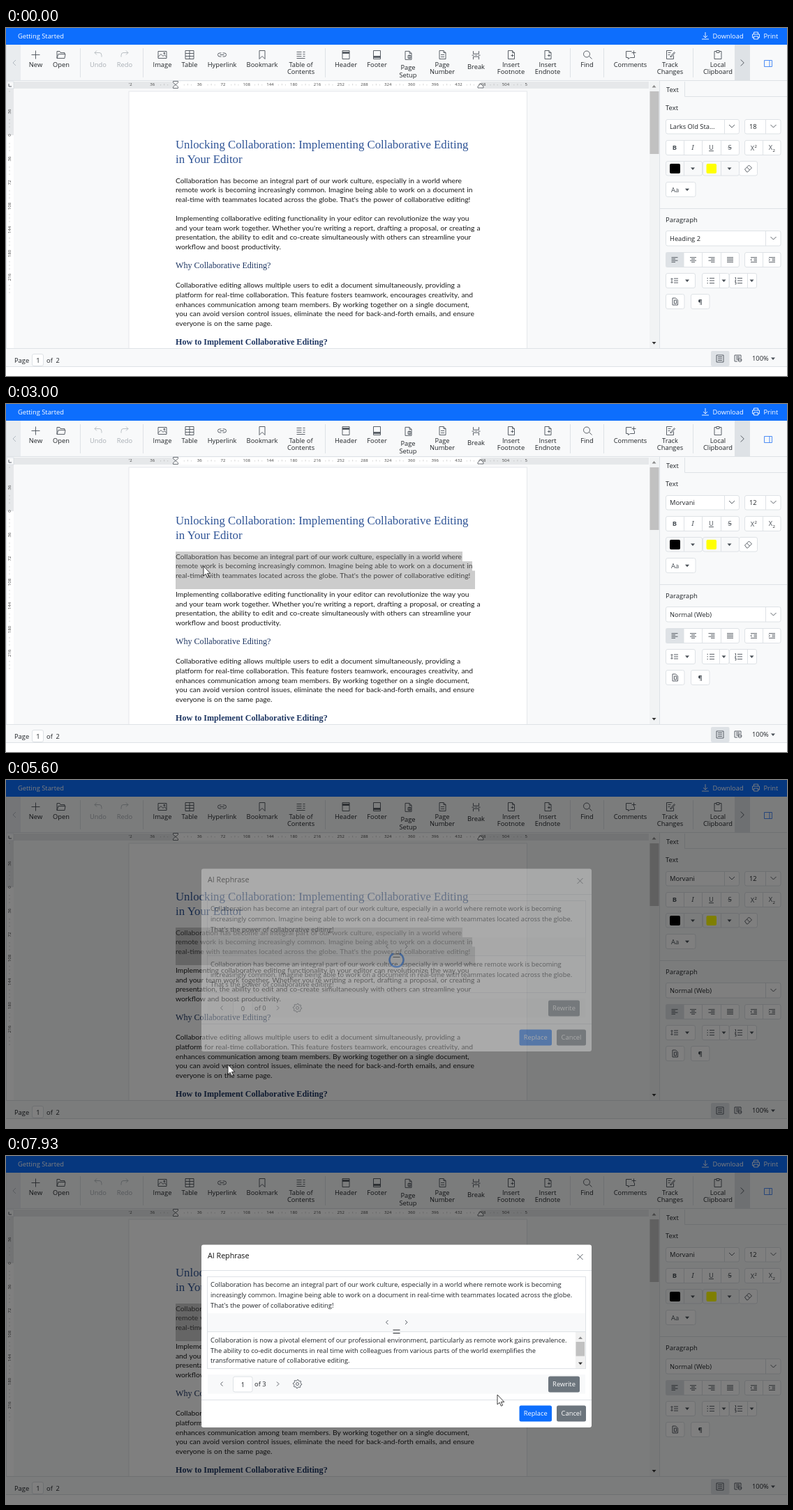
Write an HTML page that moves like this. It is 1119x500 px and loops after 8000 ms.

```html
<!DOCTYPE html>
<html lang="en">
<head>
<meta charset="utf-8">
<title>Document editor</title>
<style>
html, body { margin: 0; width: 100%; height: 100%; overflow: hidden; background: #fff; }
svg { display: block; width: 100vw; height: 100vh; }
text { font-family: "Open Sans", "Noto Sans", sans-serif; font-size: 9.33px; fill: #212529; white-space: pre; }
.doc { font-family: Lato, sans-serif; font-size: 10.3px; word-spacing: .5px; fill: #1c1c1c; }
.serif { font-family: "Liberation Serif", serif; font-size: 12.1px; fill: #1f3763; }
.title { font-size: 16.8px; fill: #2f5496; }
.tick { font-size: 6px; fill: #444; }
.mid { text-anchor: middle; }
.icon { fill: none; stroke: #495057; stroke-width: .9; }
.line { fill: none; stroke: #dee2e6; }
</style>
</head>
<body>
<svg id="stage" viewBox="0 0 1119 500" preserveAspectRatio="none"></svg>
<script>
const LOOP = 8000, TICK = 1000 / 15;

// Markup helpers
const text = (x, y, s, cls = '', extra = '') => `<text x="${x}" y="${y}" class="${cls}" ${extra}>${s}</text>`;
const label = (x, y, s, extra) => text(x, y, s, 'mid', extra);
const rect = (x, y, w, h, fill, extra = '') => `<rect x="${x}" y="${y}" width="${w}" height="${h}" fill="${fill}" ${extra}/>`;
const box = (x1, y1, x2, y2, fill = '#fff') => rect(x1 + .5, y1 + .5, x2 - x1 - 1, y2 - y1 - 1, fill, 'stroke="#dee2e6" rx="2.5"');
const path = (d, extra = '') => `<path d="${d}" ${extra}/>`;
const line = d => path(d, 'class="line"');
const icon = (x, y, d, extra = '') => `<g transform="translate(${x} ${y})">${path(d, 'class="icon" ' + extra)}</g>`;
const caret = (x, y, s = 1, fill = '#495057') => path(`M${x - 3} ${y - 1.5 * s}h6l-3 ${3.4 * s}z`, `fill="${fill}"`);
const chevron = (x, y) => icon(x, y, 'M-4-2L0 2L4-2');
const side = (x, y, dir, r = 3) => icon(x, y, `M${-dir * r / 2} ${-r}L${dir * r / 2} 0L${-dir * r / 2} ${r}`);
const lines = (x, y, step, rows, cls) => rows.map((s, i) => text(x, y + i * step, s, cls)).join('');

const PAGE = 'M-4-6H2L5-3V6H-4ZM2-6V-3H5';
const ICONS = {
  plus: 'M-6 0H6M0-6V6',
  folder: 'M-6 5V-5H-2L-1-3H5V-1M-6 5L-4-1H6L5 5Z',
  undo: 'M-2-6L-5-3L-2 0M-5-3H2Q5-3 5 1V3',
  redo: 'M2-6L5-3L2 0M5-3H-2Q-5-3-5 1V3',
  image: 'M-6-5H6V5H-6ZM-6 3L-2-1L1 2L3 0L6 3M2-3H3.5V-1.5H2Z',
  table: 'M-6-6H6V6H-6ZM-6-2H6M-6 2H6M0-6V6',
  link: 'M-1-2.5H-3.5A2.5 2.5 0 0 0-3.5 2.5H-1M1-2.5H3.5A2.5 2.5 0 0 1 3.5 2.5H1M-3 0H3',
  bookmark: 'M-4-6H4V6L0 2L-4 6Z',
  toc: 'M-6-4H1M3-4H6M-6-1H1M3-1H6M-6 2H1M3 2H6M-6 5H6',
  header: 'M-5-6H5V6H-5ZM-5-4H5M-5-3H5M-5-2H5',
  footer: 'M-5-6H5V6H-5ZM-5 2H5M-5 3H5M-5 4H5',
  setup: PAGE + 'M0 0H4V4H0ZM2-1V5',
  page: PAGE + 'M-2 0H3M-2 3H3',
  brk: 'M-4-6V-2H4V-6M-4 6V2H4V6M-6 0H-3M-1 0H1M3 0H6',
  note: PAGE + 'M0 1H4M2-1V3',
  find: 'M4-1A4.5 4.5 0 1 1-5-1A4.5 4.5 0 1 1 4-1M3 2L7 6',
  comment: 'M2-5H-6V4H-3V6L0 4H6V0M2-3H8M5-6V0',
  track: 'M3-6H-5V6H5V1M-3-3H1M-3 0H0M0 3L6-4L7-3L2 3Z',
  clip: 'M-2-5H-5V6H5V-5H2M-2-6H2V-3H-2Z'
};
const TOOLS = [
  [42.5, 'plus', 'New'], [79, 'folder', 'Open'], [132, 'undo', 'Undo'], [170, 'redo', 'Redo'],
  [224, 'image', 'Image'], [263, 'table', 'Table'], [309.5, 'link', 'Hyperlink'], [367, 'bookmark', 'Bookmark'],
  [422.5, 'toc', 'Table of|Contents'], [487, 'header', 'Header'], [531.5, 'footer', 'Footer'],
  [576, 'setup', 'Page|Setup', 3.5], [625, 'page', 'Page|Number'], [673.5, 'brk', 'Break', 2.5],
  [723.5, 'note', 'Insert|Footnote'], [776, 'note', 'Insert|Endnote'], [832.5, 'find', 'Find'],
  [894.5, 'comment', 'Comments'], [951.5, 'track', 'Track|Changes'], [1020, 'clip', 'Local|Clipboard']
];

function toolbar() {
  let s = rect(0, 0, 1119, 24, '#0d6efd') + rect(0, 24, 1119, 52, '#f8f9fa');
  const white = 'style="fill:#fff"', wIcon = 'style="stroke:#fff"';
  s += text(17, 14.5, 'Getting Started', '', white) + text(1012.5, 14.5, 'Download', '', white) + text(1085.5, 14.5, 'Print', '', white);
  s += icon(1002, 11, 'M0-5V3M-3 0L0 3L3 0M-5 5H5', wIcon) + icon(1074.5, 11, 'M-3-2V-5H3V-2M-3 3H-5V-2H5V3H3M-3 1H3V5H-3Z', wIcon);
  s += rect(0, 24, 21, 51, '#e9ecef') + icon(12, 50, 'M2-4L-2 0L2 4', 'style="stroke:#adb5bd"');
  s += line('M106.5 29V71M196.5 29V71M457.5 29V71M808.5 29V71M856.5 29V71M984.5 29V71');
  for (const [x, name, names, dy = 0] of TOOLS) {
    const dim = /do$/.test(name);
    s += icon(x, 38.5 + dy / 4, ICONS[name], dim ? 'style="stroke:#b4babf"' : '');
    names.split('|').forEach((n, i) => s += label(x, 56.3 + dy + i * (dy ? 11 : 9.6), n, dim ? 'style="fill:#a9afb5"' : ''));
  }
  s += rect(1044, 24, 22, 51, '#dee2e6') + side(1055, 50, 1, 4.5);
  s += icon(1092, 51, 'M-5.5-4.5H5.5V4.5H-5.5ZM2-4.5V4.5', 'style="stroke:#3d83f5"');
  return s + line('M0 75.5H1119M.5 24V486');
}

function rulers() {
  let s = rect(0, 76, 936, 385, '#f8f9fa') + rect(11, 77, 910, 10, '#e6e8ea') + rect(243, 77, 437, 10, '#fff');
  s += rect(1, 77, 10, 77, '#e6e8ea') + rect(1, 154, 10, 306, '#fff') + rect(1, 77, 10, 10, '#f8f9fa', 'stroke="#ced4da" stroke-width=".6"');
  s += icon(6, 82, 'M-2-2V2H2');
  let ticks = '';
  const small = 'style="font-size:6px;fill:#444"';
  for (let i = -1; i <= 14; i++) {
    const x = 243.5 + i * 33.75;
    if (i) s += label(x, 83.4, Math.abs(i * 36), small);
    for (const q of [.35, .5, .65]) ticks += `M${x + q * 33.75} ${q === .5 ? 80 : 81}V82.5`;
  }
  s += text(176, 83.4, '\'2', 'tick') + text(743.5, 83.4, '5', 'tick');
  for (let i = -1; i <= 6; i++) {
    const y = 154 + i * 34;
    s += `<g transform="translate(7 ${y}) rotate(-90)">${label(0, 0, Math.abs(i * 36), small)}</g>`;
    for (const q of [.35, .5, .65]) ticks += `M4 ${y + q * 34}H6`;
  }
  s += path(ticks + 'M4 91H6', 'stroke="#aaa" stroke-width=".5"');
  s += icon(243, 81.5, 'M-3.5-5H3.5V-3L0 0L-3.5-3ZM0 0L3.5 3V5H-3.5V3Z', 'style="fill:#fff;stroke-width:.8"');
  return s + icon(680, 83, 'M0-3L4 1V3H-4V1Z', 'style="fill:#fff;stroke-width:.8"');
}

function documentPage() {
  let s = rect(176, 91, 570.5, 380, '#fff', 'stroke="#dee2e6" stroke-width=".8"');
  s += lines(243, 172.6, 21, ['Unlocking Collaboration: Implementing Collaborative Editing', 'in Your Editor'], 'serif title');
  s += lines(243, 222.6, 13.7, [
    'Collaboration has become an integral part of our work culture, especially in a world where',
    'remote work is becoming increasingly common. Imagine being able to work on a document in',
    'real-time with teammates located across the globe. That\'s the power of collaborative editing!'], 'doc');
  s += lines(243, 276.9, 13.7, [
    'Implementing collaborative editing functionality in your editor can revolutionize the way you',
    'and your team work together. Whether you\'re writing a report, drafting a proposal, or creating a',
    'presentation, the ability to edit and co-create simultaneously with others can streamline your',
    'workflow and boost productivity.'], 'doc');
  s += text(243, 345, 'Why Collaborative Editing?', 'serif');
  s += lines(243, 373.2, 13.65, [
    'Collaborative editing allows multiple users to edit a document simultaneously, providing a',
    'platform for real-time collaboration. This feature fosters teamwork, encourages creativity, and',
    'enhances communication among team members. By working together on a single document,',
    'you can avoid version control issues, eliminate the need for back-and-forth emails, and ensure',
    'everyone is on the same page.'], 'doc');
  s += text(243, 454.6, 'How to Implement Collaborative Editing?', 'serif', 'font-weight="700"');
  return s + path('', 'id="selection" fill="#808080" fill-opacity=".4"');
}

function scrollAndStatus() {
  let s = rect(922, 77, 14, 384, '#f1f3f4') + rect(922.5, 91, 13, 90, '#c1c1c1');
  s += caret(928.5, 84, -1, '#8a8a8a') + caret(928.5, 452.5, 1, '#333');
  s += rect(0, 460.5, 1119, 26, '#f8f9fa') + rect(0, 486.5, 1119, 13.5, '#fff') + line('M0 460.5H1119M0 486.5H1119');
  s += text(12, 480.6, 'Page') + box(37, 468, 54, 486) + label(45.8, 480.6, '1') + text(58, 480.6, 'of') + text(71.5, 480.6, '2');
  s += rect(1010, 464, 26.5, 22, '#dee2e6', 'rx="2"') + icon(1023, 475, 'M-5-5H5V5H-5ZM-3-2.5H3M-3 0H3M-3 2.5H3');
  s += icon(1049, 475, 'M4-1V-5H-5V4H-1M-3-3H2M-3-1H2M-3 1H0M5 2A2.5 2.5 0 1 1 0 2A2.5 2.5 0 1 1 5 2M0 2H5');
  return s + text(1069, 478.4, '100%') + caret(1099, 475);
}

const bars = (x, y, offs) => icon(x, y, offs.map(([a, b], i) => `M${a} ${i * 2.2 - 3.3}H${b}`).join(''));

function panel() {
  let s = rect(936, 76, 183, 384.5, '#f8f9fa') + line('M936.5 76V460M972.5 77V98.5H1119M937 259.5H1119');
  s += text(946, 91.5, 'Text') + text(945, 117.8, 'Text', '', 'style="font-size:9.5px"');
  s += box(945, 131, 1051, 152.5) + box(1058, 131, 1110.5, 152.5) + line('M1029.5 131V152M1088.5 131V152');
  s += chevron(1040, 141) + chevron(1099.5, 141);
  s += text(951, 144.8, '', '', 'id="font"') + text(1065, 144.8, '', '', 'id="size"');

  s += box(945, 161, 1051, 183) + box(1058, 161, 1110.5, 183) + line('M971.5 161V183M997.5 161V183M1024.5 161V183M1084.5 161V183');
  const gray = 'fill:#495057;';
  s += label(958, 175.4, 'B', `style="${gray}font-weight:700"`) + label(984, 175.4, 'I', `style="${gray}font-style:italic;font-family:Noto Serif,serif"`);
  s += label(1010.5, 175.2, 'U', `style="${gray}text-decoration:underline"`) + label(1037, 175.4, 'S', `style="${gray}text-decoration:line-through"`);
  s += label(1069.5, 175.6, 'X', `style="${gray}"`) + label(1095.5, 175, 'X', `style="${gray}"`);
  s += text(1072.5, 172, '2', '', 'style="font-size:6px"') + text(1098.5, 177.5, '2', '', 'style="font-size:6px"');

  s += box(945, 191, 998, 212.5, '#f8f9fa') + box(998, 191, 1051, 212.5, '#f8f9fa') + box(1050, 191, 1077, 212.5) + line('M971.5 191V212M1024.5 191V212');
  s += rect(951, 195, 15, 14, '#000', 'rx="2"') + rect(1003.5, 195, 14.5, 14, '#ff0', 'rx="2"');
  s += caret(984, 202) + caret(1036.5, 202) + icon(1063.5, 202, 'M-5 1L1-5L5-1L-1 5H-2ZM-2-2L2 2');
  s += box(945, 221, 988.5, 243) + text(953, 235.6, 'Aa', '', `style="${gray}"`) + caret(976, 232.3);

  s += text(945, 279, 'Paragraph', '', 'style="font-size:9.5px"') + box(945, 291, 1110.5, 313.5) + line('M1088.5 291V313') + chevron(1099.5, 302);
  s += text(951, 305.8, '', '', 'id="style"');
  s += box(945, 322, 1051, 344) + rect(945.5, 322.5, 26, 21, '#dee2e6') + box(1058, 322, 1110.5, 344);
  s += line('M997.5 322V344M1024.5 322V344M1084.5 322V344');
  const wide = [-4.5, 4.5];
  s += bars(958, 333, [wide, [-4.5, 1], wide, [-4.5, 1]]) + bars(984.5, 333, [wide, [-2.5, 2.5], wide, [-2.5, 2.5]]);
  s += bars(1011, 333, [wide, [-1, 4.5], wide, [-1, 4.5]]) + bars(1037.5, 333, [wide, wide, wide, wide]);
  s += bars(1071.5, 333, [wide, [0, 4.5], [0, 4.5], wide]) + bars(1097.5, 333, [wide, [0, 4.5], [0, 4.5], wide]);
  s += icon(1069, 333, 'M-.5-1.5L-2 0L-.5 1.5') + icon(1094, 333, 'M-1-1.5L.5 0L-1 1.5');

  s += box(945, 352, 988, 374) + box(997, 352, 1036.5, 374) + box(1036, 352, 1076, 374) + line('M1022.5 352V374M1062.5 352V374');
  s += icon(958, 363, 'M-4-3V3M-5.5-2L-4-3.5L-2.5-2M-5.5 2L-4 3.5L-2.5 2M-1-3H5M-1 0H5M-1 3H5') + caret(976, 363);
  const rows = 'M-1.5-3.5H5.5M-1.5 0H5.5M-1.5 3.5H5.5';
  s += icon(1009.5, 363, rows + 'M-5-3.5H-3.5M-5 0H-3.5M-5 3.5H-3.5') + caret(1028.5, 363);
  s += icon(1049.5, 363, rows + 'M-5-4.5H-4V-2M-5-.8H-3.5L-5 1.2H-3.5M-5 2.5H-3.5V5H-5') + caret(1068.5, 363);
  s += box(945, 382, 972.5, 404) + icon(958.5, 393, 'M-3.5-5H1L4-2V5H-3.5ZM-1-2H2V3H-1Z');
  return s + box(981, 382, 1008.5, 404) + label(994.5, 397, '¶', `style="${gray}font-weight:700"`);
}

const MENU = ['Cut', 'Copy', 'Paste', 'Add Comment', 'Hyperlink...', 'AI Rephrase', 'Font...', 'Paragraph...'];
const menu = () => `<g id="menu">${box(248, 234, 407, 486)}${lines(275, 257, 30.5, MENU)}</g>`;

const BEFORE = [
  'Collaboration has become an integral part of our work culture, especially in a world where remote work is becoming',
  'increasingly common. Imagine being able to work on a document in real-time with teammates located across the globe.',
  'That\'s the power of collaborative editing!'];
const AFTER = [
  'Collaboration is now a pivotal element of our professional environment, particularly as remote work gains prevalence.',
  'The ability to co-edit documents in real time with colleagues from various parts of the world exemplifies the',
  'transformative nature of collaborative editing.'];

function button(x1, y1, x2, y2, fill, name) {
  return rect(x1, y1, x2 - x1, y2 - y1, fill, 'rx="2.5"') + label((x1 + x2) / 2, (y1 + y2) / 2 + 3.4, name, 'style="fill:#fff"');
}

function dialog() {
  let s = rect(280, 127.5, 559, 262.5, '#fff', 'rx="3"') + line('M280 164.5H839M280 350.5H839');
  s += text(289, 147.3, 'AI Rephrase', '', 'style="font-size:10.7px;fill:#111"') + icon(822.5, 145, 'M-4-4L4 4M4-4L-4 4');
  s += rect(289, 226, 541, 26.5, '#f8f9fa') + rect(288.5, 173.5, 542, 132, 'none', 'stroke="#dee2e6"') + line('M289 252.5H830');
  s += side(546, 239, -1) + side(573.5, 239, 1) + lines(293, 188.3, 14.6, BEFORE);
  s += `<g id="before">${lines(293, 267.9, 14.6, BEFORE)}</g><g id="after">${lines(293, 267.9, 14.6, AFTER)}</g>`;
  s += `<g id="bar">${rect(816, 253, 14, 52, '#f1f1f1')}${rect(816.5, 267, 12.5, 20.5, '#c1c1c1')}${caret(823, 261.5, -1, '#8a8a8a')}${caret(823, 298, 1, '#333')}</g>`;
  s += rect(289, 314, 541, 27.5, '#f8f9fa') + side(309, 327.5, -1) + side(389.5, 327.5, 1);
  s += box(325, 316.5, 353.5, 339.5) + label(339.5, 331.6, '', 'id="at"') + text(356, 331.2, '', '', 'id="of"');
  let gear = '';
  for (let i = 0; i < 32; i++) {
    const a = i * Math.PI / 16, r = i % 4 < 2 ? 6.2 : 4.8;
    gear += `${i ? 'L' : 'M'}${r * Math.cos(a)} ${r * Math.sin(a)}`;
  }
  s += icon(417.5, 327.5, gear + 'ZM2 0A2 2 0 1 1-2 0A2 2 0 1 1 2 0');
  s += button(777, 316.5, 822, 339.5, '#6c757d', 'Rewrite') + button(735.5, 358.5, 782, 381.5, '#0d6efd', 'Replace');
  s += button(789, 358.5, 831, 381.5, '#6c757d', 'Cancel');
  s += path('', 'id="spinner" fill="none" stroke="#0d6efd" stroke-width="2.6"');
  s += path('M554.5 250H564.5M554.5 254.5H564.5', 'stroke="#212529"');
  return `<g id="dialog">${s}</g>`;
}

const stage = document.getElementById('stage');
stage.innerHTML =
  `<clipPath id="clip"><rect x="11" y="87" width="911" height="373.5"/></clipPath>` + rect(0, 0, 1119, 500, '#fff') +
  rulers() + `<g clip-path="url(#clip)">${documentPage()}</g>` + toolbar() + panel() + scrollAndStatus() + menu() +
  rect(0, 0, 1119, 500, '#000', 'id="shade" fill-opacity=".5"') + dialog() +
  path('M0 0V14L3.2 11.2L5.4 16.2L7.6 15.2L5.4 10.4H9.8Z', 'id="arrow" fill="#fff" stroke="#111" stroke-width=".8"') +
  path('M-3.5-7H-1L0-6L1-7H3.5M0-6V6M-3.5 7H-1L0 6L1 7H3.5', 'id="beam" fill="none" stroke="#000" stroke-width="1.3"');

const el = {};
stage.querySelectorAll('[id]').forEach(n => el[n.id] = n);
const show = (n, on) => n.setAttribute('visibility', on ? 'visible' : 'hidden');
const put = (n, s) => { if (n.textContent !== s) n.textContent = s; };

// Pointer stops: tick, x, y
const STOPS = [
  [1, 1100, 480], [2, 750, 303], [5, 750, 303], [12, 672, 247], [15, 672, 247], [16, 655, 247], [17, 610, 245],
  [18, 538, 241], [19, 457.5, 233], [21, 330, 205], [23, 280, 170], [25, 262, 186], [28, 262, 228], [32, 240, 218],
  [42, 240, 218], [45, 283, 233], [62, 283, 233], [67, 384, 325], [72, 318, 409], [111, 318, 409], [112, 305, 445],
  [113, 295, 465], [114, 470, 400], [115, 628, 334], [117, 628, 334], [118, 680, 338], [119, 704, 343]
];
function pointer(k) {
  const i = STOPS.findIndex(s => s[0] >= k);
  if (i < 1) return STOPS[i < 0 ? STOPS.length - 1 : 0].slice(1);
  const [a, x, y] = STOPS[i - 1], [b, x2, y2] = STOPS[i], p = (k - a) / (b - a);
  return [x + (x2 - x) * p, y + (y2 - y) * p];
}

// The selection follows the pointer one tick late.
function selection(k) {
  if (k < 16) return '';
  const rows = [[157, 178, 663], [178, 212, 339], [212, 226, 654], [226, 239.5, 668], [239.5, 266, k < 29 ? 665 : 672]];
  const [x, y] = pointer(Math.min(k - 1, 32));
  const first = rows.findIndex(r => y < r[1]);
  return rows.slice(first).map(([top, bottom, right], i) => {
    const left = i ? 243 : Math.min(right, Math.max(243, x));
    return `M${left} ${top}H${right}V${bottom}H${left}Z`;
  }).join('');
}

function spinner(t) {
  const dt = t - 5600, end = 245 + .8 * dt, size = 170 + 140 * Math.cos(dt * 2 * Math.PI / 666);
  const at = deg => `${559.5 + 10 * Math.cos(deg * Math.PI / 180)} ${258.5 + 10 * Math.sin(deg * Math.PI / 180)}`;
  return `M${at(end - size)}A10 10 0 ${size > 180 ? 1 : 0} 1 ${at(end)}`;
}

function draw(ms) {
  const k = Math.floor((ms + 4) / TICK), t = k * TICK;
  const [x, y] = pointer(k), beam = k >= 2 && k < 37;
  show(el.beam, beam);
  show(el.arrow, k >= 1 && !beam);
  el.beam.setAttribute('transform', `translate(${x} ${y})`);
  el.arrow.setAttribute('transform', `translate(${x} ${y})`);
  el.selection.setAttribute('d', selection(k));

  const body = k >= 37;
  put(el.font, body ? 'Morvani' : 'Larks Old Sta...');
  put(el.size, body ? '12' : '18');
  put(el.style, body ? 'Normal (Web)' : 'Heading 2');
  show(el.menu, k >= 56 && k < 80);

  const p = Math.min(1, Math.max(0, (t - 5466) / 345));
  show(el.shade, k >= 83);
  el.dialog.setAttribute('opacity', p * p * (3 - 2 * p));
  const done = k >= 108, counted = k >= 109;
  el.before.setAttribute('opacity', done ? 0 : 1);
  el.after.setAttribute('opacity', done ? 1 : 0);
  el.bar.setAttribute('opacity', done ? 1 : 0);
  el.spinner.setAttribute('d', done ? '' : spinner(t));
  put(el.at, counted ? '1' : '0');
  put(el.of, counted ? 'of 3' : 'of 0');
}

const start = performance.now();
function loop() {
  draw((performance.now() - start) % LOOP);
  requestAnimationFrame(loop);
}
loop();
</script>
</body>
</html>
```
